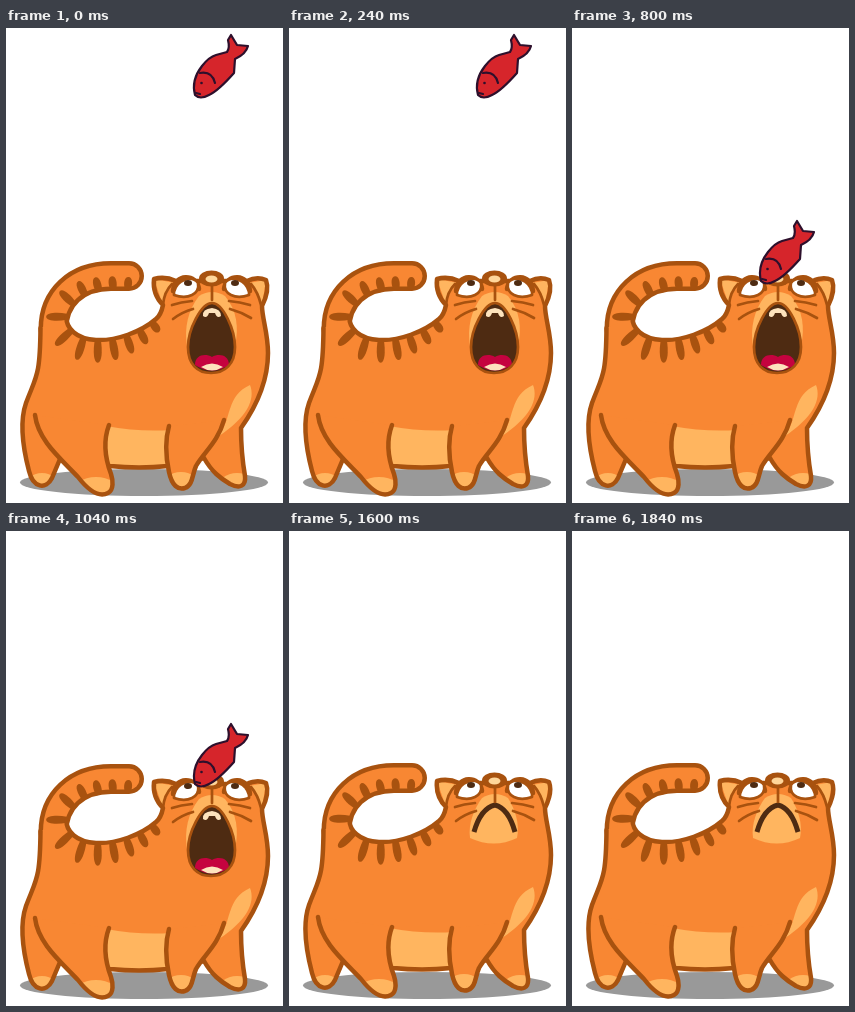
Animation, 277 px wide and 475 px high, one loop 2000 ms. Source, as an HTML page:

```html
<!DOCTYPE html>
<html lang="en">
<head>
<meta charset="utf-8">
<title>Hungry cat</title>
<style>
html, body { margin: 0; width: 100%; height: 100%; overflow: hidden; background: #fff; }
svg { display: block; width: 100vw; height: 100vh; }
.line { fill: none; stroke: #a8520f; stroke-width: 4.5; stroke-linecap: round; stroke-linejoin: round; }
.thin { stroke-width: 2.7; }
.fur { fill: #f88733; }
.light { fill: #ffb55f; }
.cream { fill: #fde3bd; }
.dark { fill: #4e2b12; }
.brown { fill: #a8520f; }
</style>
</head>
<body>
<svg viewBox="0 0 277 475">
  <defs>
    <path id="tail" d="M123 248H105C70 248 47.5 270 47.5 301" fill="none" stroke-linecap="round"/>
    <path id="body" d="M34.5 300C34 350 30 348 20 375C13 395 17 420 23 443C27 460 40 462 46 450
      L54 431L104 438Q133 441 162 438L198 430C206 444 214 450 224 456C234 461 240 458 239 448
      Q235 425 235 400C252 376 262 350 262 325C262 305 256 290 256 278C261 268 263 260 260 252
      Q251 248 241 253H170Q159 248 148 251C147 260 150 270 157 277
      Q155 287 150 291C135 304 110 313 90 312C70 311 60 300 60.5 289"/>
    <path id="hind" d="M29 387C32 412 54 430 72 449C82 462 92 470 102 465C108 462 107 452 105 446C99 430 97 413 103 397"/>
    <path id="fore" d="M163 398C159 412 160 430 163 444C166 458 172 462 179 460C187 457 186 447 190 438C198 424 212 414 218 392"/>
    <path id="mouth" d="M206 275C217 275 229 302 229 319C229 336 219 345 205 345C191 345 182 336 182 319C182 302 195 275 206 275Z"/>
    <clipPath id="inBody"><use href="#body"/></clipPath>
    <clipPath id="inHind"><use href="#hind"/></clipPath>
    <clipPath id="inFore"><use href="#fore"/></clipPath>
  </defs>

  <ellipse cx="138" cy="454.5" rx="124" ry="13.5" fill="#999"/>

  <g id="cat">
    <use href="#tail" stroke="#a8520f" stroke-width="30"/>
    <use href="#tail" stroke="#f88733" stroke-width="21"/>
    <use href="#body" class="fur"/>
    <g class="light" clip-path="url(#inBody)">
      <path d="M100 398Q132 404 165 402V445H100Z"/>
      <ellipse cx="36" cy="461" rx="18" ry="16"/>
      <ellipse cx="231" cy="461" rx="20" ry="16"/>
      <path d="M244 357C250 372 240 390 213 408C226 390 220 368 244 357Z"/>
      <path d="M148 251L169 255Q159 264 157 277ZM260 252L243 255Q252 264 256 277Z"/>
    </g>
    <g id="stripes" class="brown"></g>
    <use href="#body" class="line"/>
    <use href="#hind" class="fur"/>
    <use href="#fore" class="fur"/>
    <ellipse class="light" cx="90" cy="466" rx="24" ry="17" clip-path="url(#inHind)"/>
    <ellipse class="light" cx="175" cy="462" rx="20" ry="18" clip-path="url(#inFore)"/>
    <use href="#hind" class="line"/>
    <use href="#fore" class="line"/>
    <path class="line thin" d="M166 256Q158 264 157 277M245 256Q252 264 255 277"/>

    <g id="open">
      <path class="light" d="M193 268Q206 260 219 268C231 282 233 300 229 318H181C178 300 182 282 193 268Z"/>
      <use href="#mouth" class="dark"/>
      <path fill="#c5033f" d="M189 337C189 327 199 325 206 329C213 325 223 327 223 337Q206 348 189 337Z"/>
      <path class="cream" d="M195 339Q206 332 217 339Q206 346 195 339ZM197 288Q196 281 206 280Q215 281 215 288Q211 291 209 285H203Q201 291 197 288Z"/>
      <use href="#mouth" class="line thin"/>
    </g>
    <g id="closed">
      <path class="light" d="M193 268Q206 260 219 268C226 279 231 294 228 308Q205 319 181 308C179 294 185 279 193 268Z"/>
      <path fill="none" stroke="#4e2b12" stroke-width="5" d="M185 302C190 284 198 277 206 275C214 277 221 284 226 302"/>
    </g>

    <path class="line thin" d="M206 257V272M186 273Q175 274 166 277M187 281Q176 284 167 291
      M223 273Q234 274 244 277M224 281Q235 284 245 290"/>
    <g id="eyes"></g>
    <ellipse class="brown" cx="205.5" cy="250.5" rx="12.5" ry="8"/>
    <ellipse cx="205.5" cy="251" rx="6" ry="3.5" fill="#ffd69a"/>
  </g>

  <g id="fish" stroke="#2d102c" stroke-width="2.2" stroke-linejoin="round" stroke-linecap="round">
    <path fill="#d6252b" d="M225 7L231 17L242 18Q240 26 229 31L228 45Q212 63 203 67Q194 72 189 67
      Q185 52 196 38Q203 29 210 27L221 24Q224 20 222 12Z"/>
    <path fill="none" d="M194 45Q206 43 209 55M190 65L194 66"/>
    <circle cx="195.5" cy="55" r="1.3" fill="#2d102c" stroke="none"/>
  </g>
</svg>
<script>
const el = id => document.getElementById(id);

// Stripes fan out at even steps along the curve between tail and back.
function drawStripes() {
  const curve = document.createElementNS("http://www.w3.org/2000/svg", "path");
  curve.setAttribute("d", "M135 260C130 263 120 260 110 261C85 263 63 273 61 288C60 300 70 311 90 312C110 313 135 304 150 291");
  const count = 13, step = curve.getTotalLength() / (count + 0.3);
  let shapes = "";
  for (let i = 0; i < count; i++) {
    const at = step * (i + 1);
    const a = curve.getPointAtLength(at - 1), b = curve.getPointAtLength(at + 1);
    const angle = Math.atan2(b.y - a.y, b.x - a.x) * 180 / Math.PI + 90;
    const length = 12 + 11 * Math.sin(Math.PI * (i / (count - 1)) ** 1.4);
    shapes += `<path transform="translate(${a.x} ${a.y}) rotate(${angle})"
      d="M0-3C${length / 2}-5 ${length}-4 ${length} 0C${length} 4 ${length / 2} 5 0 3Z"/>`;
  }
  el("stripes").innerHTML = shapes;
}

const eye = (x, side) => `<g transform="translate(${x} 260) scale(${side} 1)">
  <path class="line fur" style="fill:#f88733" d="M-13 3C-12-15 11-15 13 1"/>
  <path class="line thin" style="fill:#fff" d="M-12 4C-9-9 6-13 12-5C14 6 2 12-12 7Z"/>
  <ellipse class="dark" cx="2" cy="-5" rx="4" ry="3"/></g>`;

const stepTime = 400;
const meal = [[0, 0], [425, 89], [0, 186], [407, 263]];

function draw(time) {
  const step = Math.floor(time / stepTime) % (meal.length + 1);
  const eating = step === meal.length;
  el("fish").style.display = el("open").style.display = eating ? "none" : "";
  el("closed").style.display = eating ? "" : "none";
  el("cat").setAttribute("transform", `translate(0 ${eating ? -1 : 0})`);
  if (!eating) {
    const flip = step % 2 ? -1 : 1;
    el("fish").setAttribute("transform", `translate(${meal[step]}) scale(${flip} 1)`);
  }
}

drawStripes();
el("eyes").innerHTML = eye(180, 1) + eye(231, -1);

const start = performance.now();
function tick() {
  draw(performance.now() - start);
  requestAnimationFrame(tick);
}
tick();
</script>
</body>
</html>
```
